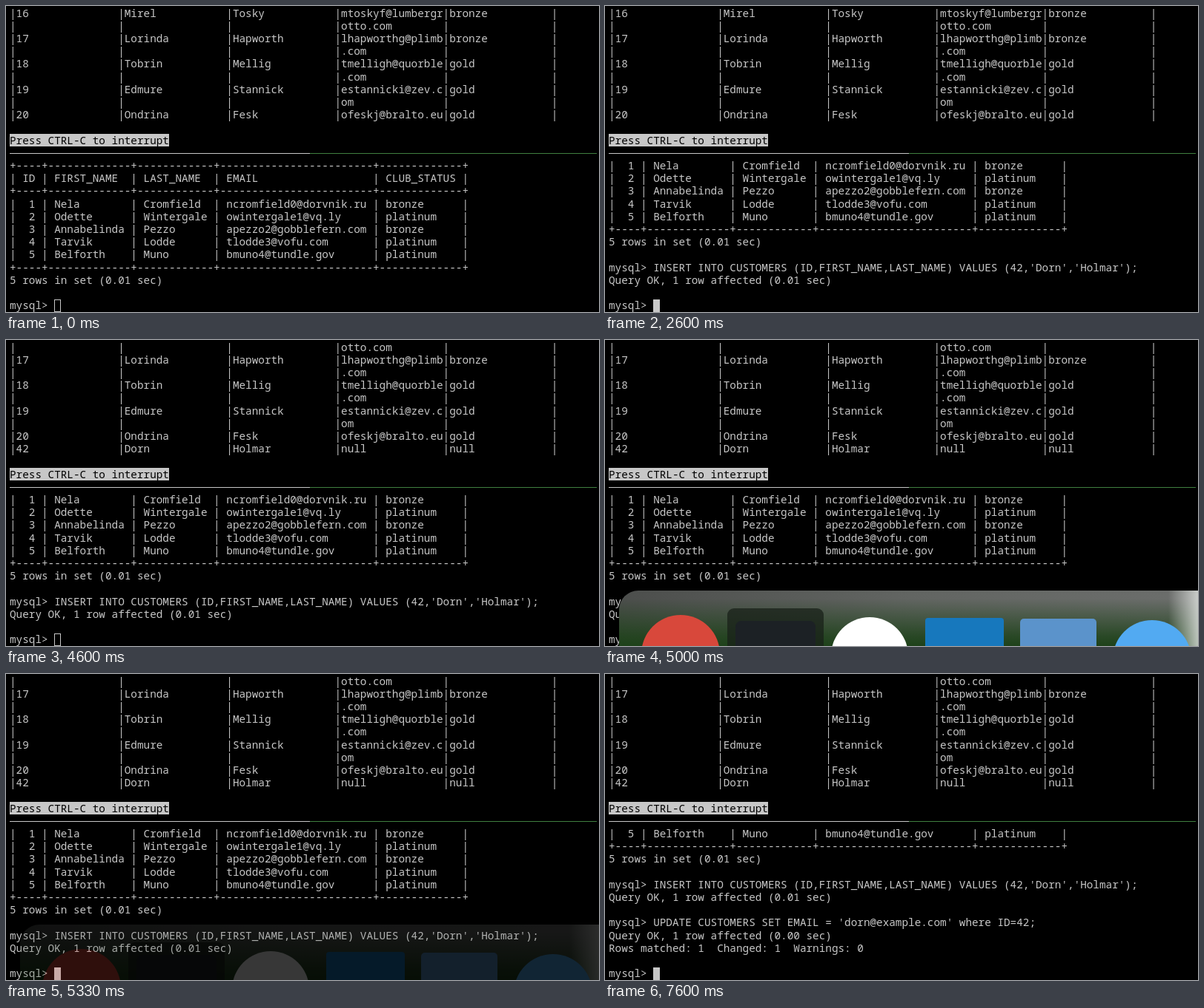
An HTML page with a canvas for the animation above (8 s loop, 800x414 px).

```html
<!DOCTYPE html>
<html lang="en">
<head>
<meta charset="utf-8">
<title>Terminal panes</title>
<style>
  html, body { margin: 0; width: 100%; height: 100%; overflow: hidden; background: #000; }
  canvas { display: block; }
</style>
</head>
<body>
<canvas id="stage" width="800" height="414"></canvas>
<script>
const LOOP = 8000, COL = 8.6, ROW = 17.2, LEFT = 5, BASE = 14.5;
const FADE_AT = 5000, FADE_MS = 420;
const INK = '#c7c7c7';
const FONT = '14.333px "Noto Sans Mono", "DejaVu Sans Mono", monospace';
const ctx = document.getElementById('stage').getContext('2d');

// Upper pane: 16-character columns, long values wrap
const wideRow = cells => {
  const height = Math.ceil(Math.max(...cells.map(c => c.length)) / 16);
  return Array.from({ length: height }, (_, i) =>
    '|' + cells.map(c => c.slice(i * 16, i * 16 + 16).padEnd(16) + '|').join(''));
};
const upper = [
  ['16', 'Mirel', 'Tosky', 'mtoskyf@lumbergrotto.com', 'bronze'],
  ['17', 'Lorinda', 'Hapworth', 'lhapworthg@plimb.com', 'bronze'],
  ['18', 'Tobrin', 'Mellig', 'tmelligh@quorble.com', 'gold'],
  ['19', 'Edmure', 'Stannick', 'estannicki@zev.com', 'gold'],
  ['20', 'Ondrina', 'Fesk', 'ofeskj@bralto.eu', 'gold'],
  ['42', 'Dorn', 'Holmar', 'null', 'null']
].flatMap(wideRow);

// Lower pane: a log of which the last 12 lines show
const widths = [2, 11, 10, 22, 11];
const rule = '+' + widths.map(w => '-'.repeat(w + 2) + '+').join('');
const tableRow = cells => '|' + cells.map((c, i) =>
  ' ' + (i ? c.padEnd(widths[i]) : c.padStart(widths[i])) + ' |').join('');
const prompt = 'mysql> ';

const start = [
  rule,
  tableRow(['ID', 'FIRST_NAME', 'LAST_NAME', 'EMAIL', 'CLUB_STATUS']),
  rule,
  ...[
    ['1', 'Nela', 'Cromfield', 'ncromfield0@dorvnik.ru', 'bronze'],
    ['2', 'Odette', 'Wintergale', 'owintergale1@vq.ly', 'platinum'],
    ['3', 'Annabelinda', 'Pezzo', 'apezzo2@gobblefern.com', 'bronze'],
    ['4', 'Tarvik', 'Lodde', 'tlodde3@vofu.com', 'platinum'],
    ['5', 'Belforth', 'Muno', 'bmuno4@tundle.gov', 'platinum']
  ].map(tableRow),
  rule,
  '5 rows in set (0.01 sec)',
  ''
];
const inserted = [
  ...start,
  prompt + "INSERT INTO CUSTOMERS (ID,FIRST_NAME,LAST_NAME) VALUES (42,'Dorn','Holmar');",
  'Query OK, 1 row affected (0.01 sec)',
  ''
];
const updated = [
  ...inserted,
  prompt + "UPDATE CUSTOMERS SET EMAIL = 'dorn@example.com' where ID=42;",
  'Query OK, 1 row affected (0.00 sec)',
  'Rows matched: 1  Changed: 1  Warnings: 0',
  ''
];

function box(c, x, y, w, h, r, fill) {
  c.beginPath();
  c.roundRect(x, y, w, h, r);
  c.fillStyle = fill;
  c.fill();
}

function disc(c, x, y, r, fill) {
  c.beginPath();
  c.arc(x, y, r, 0, Math.PI * 2);
  c.fillStyle = fill;
  c.fill();
}

function fade(c, x0, y0, x1, y1, ...stops) {
  const g = c.createLinearGradient(x0, y0, x1, y1);
  stops.forEach(([at, colour]) => g.addColorStop(at, colour));
  return g;
}

// The app switcher is painted once so that it can fade as one layer
function makeSwitcher() {
  const layer = document.createElement('canvas');
  layer.width = 800;
  layer.height = 414;
  const c = layer.getContext('2d');
  const panel = fill => box(c, 19, 339, 830, 140, 26, fill);
  panel(fade(c, 19, 0, 800, 0, [0, '#4c4e4c'], [0.5, '#626562'], [1, '#6c6e6c']));
  panel(fade(c, 0, 350, 0, 414, [0, 'rgba(30,66,26,0)'], [0.8, 'rgba(30,66,26,.85)'], [1, '#1e421a']));
  panel(fade(c, 760, 0, 800, 0, [0, 'rgba(225,228,225,0)'], [1, 'rgba(225,228,225,.8)']));
  box(c, 165, 363, 130, 130, 9, 'rgba(24,32,24,.75)');
  disc(c, 102, 425, 53, '#d8483b');
  box(c, 176, 380, 108, 108, 8, '#1c2125');
  disc(c, 357, 427, 52, '#fff');
  box(c, 432, 376, 106, 106, 4, '#1778bd');
  box(c, 560, 377, 103, 103, 5, '#5b93cb');
  disc(c, 738, 432, 53, '#52aaf2');
  return layer;
}
const switcher = makeSwitcher();

function print(lines, firstRow, colour = INK) {
  ctx.fillStyle = colour;
  lines.forEach((s, i) => ctx.fillText(s, LEFT, BASE + (firstRow + i) * ROW));
}

// Pointer path: time, x, y
const path = [[70, 420, 329], [130, 410, 355], [200, 396, 390], [270, 389, 401], [330, 387.5, 377]];

function pointerAt(t) {
  if (t < 70 || t >= 2330) return null;
  const i = path.findIndex(p => p[0] > t);
  if (i < 0) return path[path.length - 1].slice(1);
  const [a, b] = [path[i - 1], path[i]];
  const k = (t - a[0]) / (b[0] - a[0]);
  return [a[1] + (b[1] - a[1]) * k, a[2] + (b[2] - a[2]) * k];
}

function drawPointer([x, y]) {
  ctx.strokeStyle = '#e8e8e8';
  ctx.lineWidth = 1.2;
  ctx.beginPath();
  for (const s of [-1, 1]) {
    ctx.moveTo(x - 3.2, y + 7 * s);
    ctx.quadraticCurveTo(x, y + 7 * s, x, y + 5 * s);
    ctx.quadraticCurveTo(x, y + 7 * s, x + 3.2, y + 7 * s);
  }
  ctx.moveTo(x, y - 5);
  ctx.lineTo(x, y + 5);
  ctx.stroke();
}

function drawCursor(focused) {
  if (focused) {
    ctx.fillStyle = INK;
    ctx.fillRect(65, 397, 9, 17);
  } else {
    ctx.strokeStyle = INK;
    ctx.lineWidth = 1;
    ctx.strokeRect(65.5, 397.5, 8, 16);
  }
}

function draw(t) {
  ctx.fillStyle = '#000';
  ctx.fillRect(0, 0, 800, 414);
  ctx.font = FONT;

  const first = t < 2870 ? 0 : 1;
  print(upper.slice(first, first + 9), 0);

  ctx.fillStyle = INK;
  ctx.fillRect(LEFT, 173, 25 * COL, 17);
  print(['Press CTRL-C to interrupt'], 10, '#000');

  ctx.fillStyle = INK;
  ctx.fillRect(LEFT, 199, 405, 1);
  ctx.fillStyle = '#3f7f3f';
  ctx.fillRect(410, 199, 387, 1);

  const log = t < 1330 ? start : t < 7200 ? inserted : updated;
  print([...log, prompt].slice(-12), 12);
  drawCursor((t >= 530 && t < 3930) || t >= 5070);

  const pointer = pointerAt(t);
  if (pointer) drawPointer(pointer);

  if (t >= FADE_AT && t < FADE_AT + FADE_MS) {
    ctx.globalAlpha = 1 - (t - FADE_AT) / FADE_MS;
    ctx.drawImage(switcher, 0, 0);
    ctx.globalAlpha = 1;
  }
}

// Motion advances in steps of a fifteenth of a second, rounded to 10 ms
function step(ms) {
  const n = Math.floor((ms + 5) * 0.015);
  return Math.round(n / 0.15) * 10;
}

let began = null;
function tick(now) {
  began ??= now;
  draw(step((now - began) % LOOP));
  requestAnimationFrame(tick);
}
draw(0);
requestAnimationFrame(tick);
</script>
</body>
</html>
```
